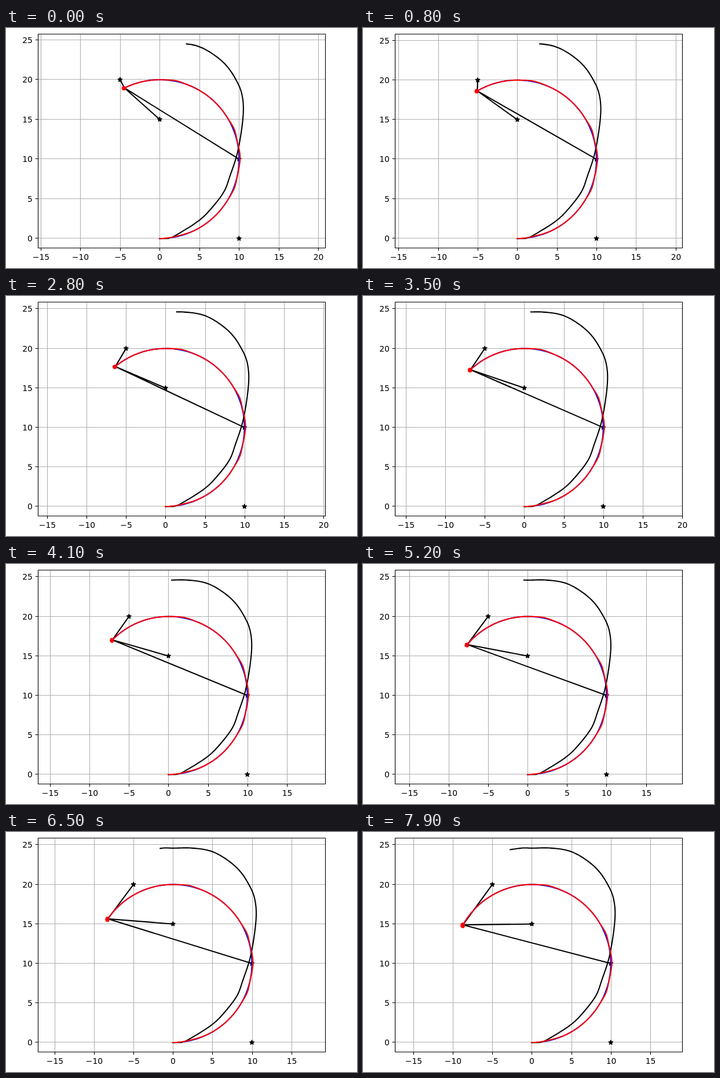
An HTML page for the animation above (8000 ms loop, 606 by 414 pixels).

```html
<!DOCTYPE html>
<html lang="en">
<head>
<meta charset="utf-8">
<title>Localization plot</title>
<style>
  html, body { margin: 0; width: 100%; height: 100%; overflow: hidden; background: #fff; }
  svg { display: block; width: 606px; height: 414px; }
  text { font: 13.89px "DejaVu Sans", sans-serif; }
  path { fill: none; stroke: #000; stroke-width: 2.08; stroke-linejoin: round; stroke-linecap: square; }
  #grid { stroke: #b0b0b0; stroke-width: 1.11; stroke-linecap: butt; }
  #ticks, #frame { stroke-width: 1.11; stroke-linecap: butt; }
  #stars { fill: #000; stroke-width: 1.39; stroke-linejoin: bevel; }
  #cloud { stroke: #f00; stroke-width: 5.56; stroke-linecap: round; }
  #truth { stroke: #00f; }
  #estimate { stroke: #f00; }
</style>
</head>
<body>
<svg viewBox="0 0 606 414">
  <path id="grid"/>
  <path id="ticks"/>
  <path id="rays"/>
  <path id="stars"/>
  <path id="cloud"/>
  <path id="truth"/>
  <path id="reckoning"/>
  <path id="estimate"/>
  <path id="frame" d="M55.5 10.5H551.5V379.5H55.5Z"/>
  <g id="labels"></g>
</svg>
<script>
const LOOP = 8000;
const REDRAW = 100;
const RANGE = 20;
const AXES = { l: 55.4, r: 551.4, t: 10.55, b: 379.9 };
const LANDMARKS = [[10, 0], [10, 10], [0, 15], [-5, 20]];

// Key points of the dead reckoning path
const DEAD = [[0, 0], [1.2, .05], [2.5, .68], [5, 2.3], [6.6, 3.9], [8.1, 5.9],
  [8.85, 7.85], [9.87, 11.1], [10.52, 15.5], [10.35, 18.2], [9.5, 20.2], [8.25, 21.95],
  [6.45, 23.4], [4.55, 24.3], [2.2, 24.62], [0, 24.6], [-1.1, 24.62], [-2.8, 24.41]];

// Bumps in the estimate's radius: angle, height, width
const BUMPS = [[.25, -.06, .12], [1.2, .1, .1], [1.6, .14, .15], [1.95, .13, .1], [2.93, .08, .1]];

const $ = id => document.getElementById(id);
const setPath = (id, d) => $(id).setAttribute("d", d);
const snapX = x => Math.round(x) + .5;
const snapY = y => Math.round(y) - .5;

function spline(pts, n = 8) {
  const last = pts.length - 1, out = [];
  for (let i = 0; i < last; i++) {
    const [a, b, c, d] = [-1, 0, 1, 2].map(o => pts[Math.min(last, Math.max(0, i + o))]);
    for (let j = 0; j < n; j++) {
      const t = j / n;
      out.push([0, 1].map(k => b[k] + .5 * t * (c[k] - a[k] +
        t * (2 * a[k] - 5 * b[k] + 4 * c[k] - d[k] + t * (3 * (b[k] - c[k]) + d[k] - a[k])))));
    }
  }
  return [...out, pts[last]];
}

function random(seed) {
  let s = seed * 7919 + 17;
  return () => (s = (s * 16807) % 2147483647) / 2147483647;
}

const deadLine = spline(DEAD);
const turn = deadLine.findIndex(p => p[1] > 20);

// The path's upper branch runs left, so its tip is given by x
function deadUntil(tip) {
  const end = deadLine.findIndex((p, i) => i > turn && p[0] <= tip);
  if (end < 0) return deadLine;
  const [a, b] = [deadLine[end - 1], deadLine[end]];
  const f = (tip - a[0]) / (b[0] - a[0]);
  return [...deadLine.slice(0, end), [tip, a[1] + f * (b[1] - a[1])]];
}

function arc(end, radius) {
  const n = Math.ceil(end / .05);
  return Array.from({ length: n + 1 }, (_, i) => {
    const a = end * i / n, r = radius(a);
    return [r * Math.sin(a), 10 - r * Math.cos(a)];
  });
}

const drift = a => BUMPS.reduce((sum, [c, h, w]) => sum + h * Math.exp(-(((a - c) / w) ** 2)), 0);

function star([x, y]) {
  let d = "";
  for (let i = 0; i < 10; i++) {
    const r = i % 2 ? 1.59 : 4.17, a = i * Math.PI / 5;
    d += (i ? "L" : "M") + (x + r * Math.sin(a)).toFixed(2) + " " + (y - r * Math.cos(a)).toFixed(2);
  }
  return d + "Z";
}

function cloud([x, y], step) {
  const rnd = random(step + 1);
  const tall = 1.2 + (step / 60) ** 2;
  let d = "";
  for (let i = 0; i < 40; i++) {
    const a = rnd() * 2 * Math.PI, r = Math.sqrt(rnd());
    d += `M${(x + 1.2 * r * Math.cos(a)).toFixed(2)} ${(y + tall * r * Math.sin(a)).toFixed(2)}h.01`;
  }
  return d;
}

const label = (x, y, anchor, v) =>
  `<text x="${x}" y="${y}" text-anchor="${anchor}">${String(v).replace("-", "\u2212")}</text>`;

function drawAxes(x0, y0, scale) {
  let grid = "", ticks = "", labels = "";
  for (let v = -20; v <= 25; v += 5) {
    const x = x0 + v * scale, y = y0 - v * scale;
    if (x > AXES.l && x < AXES.r) {
      grid += `M${snapX(x)} 10.5V379.5`;
      ticks += `M${snapX(x)} 379.5v4.86`;
      labels += label(snapX(x), 400, "middle", v);
    }
    if (y > AXES.t && y < AXES.b) {
      grid += `M55.5 ${snapY(y)}H551.5`;
      ticks += `M55.5 ${snapY(y)}h-4.86`;
      labels += label(45.8, snapY(y) + 5, "end", v);
    }
  }
  setPath("grid", grid);
  setPath("ticks", ticks);
  $("labels").innerHTML = labels;
}

function draw(step) {
  const angle = Math.PI + .46 + .01 * step;
  const truth = arc(angle, () => 10);
  const estimate = arc(angle + .008, a => 10 + drift(a));
  const dead = deadUntil(3.38 - .075 * step - .00045 * step ** 2);
  const robot = truth.at(-1);

  // Equal aspect: the height sets the scale, the width is centred on the data
  const top = Math.max(...dead.map(p => p[1]));
  const left = Math.min(-5, robot[0] - .08);
  const right = Math.max(...dead.map(p => p[0]));
  const scale = (AXES.b - AXES.t) / (1.1 * top);
  const x0 = (AXES.l + AXES.r) / 2 - (left + right) / 2 * scale;
  const y0 = AXES.b - .05 * top * scale;
  const map = ([x, y]) => [x0 + x * scale, y0 - y * scale];
  const line = pts => "M" + pts.map(p => map(p).map(v => v.toFixed(2)).join(" ")).join("L");

  drawAxes(x0, y0, scale);
  const seen = LANDMARKS.filter(m => Math.hypot(m[0] - robot[0], m[1] - robot[1]) <= RANGE);
  setPath("rays", seen.map(m => line([robot, m])).join(""));
  setPath("stars", LANDMARKS.map(m => star(map(m))).join(""));
  setPath("cloud", cloud(map(estimate.at(-1)), step));
  setPath("truth", line(truth));
  setPath("reckoning", line(dead));
  setPath("estimate", line(estimate));
}

// Each step takes a little longer than the last: t = 114 k + 0.28 k²
function stepAt(ms) {
  const t = Math.floor(ms / REDRAW) * REDRAW;
  return Math.round((Math.sqrt(114 ** 2 + 4 * .28 * t) - 114) / (2 * .28));
}

const start = performance.now();
let shown = -1;
function tick() {
  const step = stepAt((performance.now() - start) % LOOP);
  if (step !== shown) draw(shown = step);
  requestAnimationFrame(tick);
}
tick();
</script>
</body>
</html>
```
